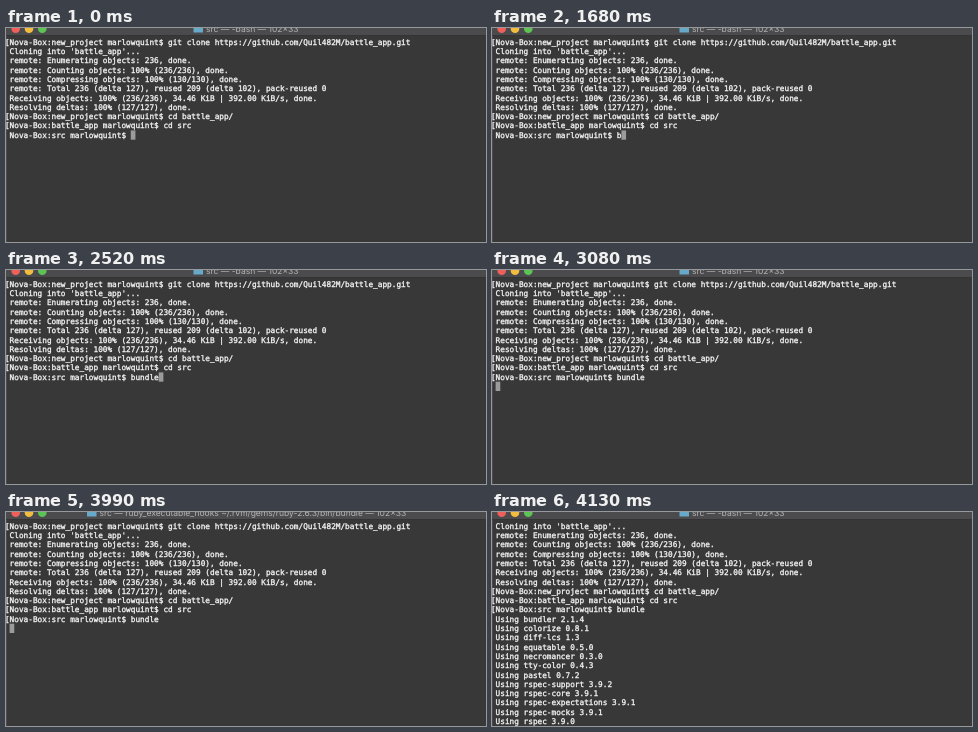
Recreate the animation shown at these times as an HTML page with a canvas. Size 480x214 px, loop 5.32 s.

```html
<!DOCTYPE html>
<html lang="en">
<head>
<meta charset="utf-8">
<title>Terminal</title>
<style>
  html, body { margin: 0; width: 100%; height: 100%; overflow: hidden; background: #383838; }
  canvas { display: block; width: 100vw; height: 100vh; }
</style>
</head>
<body>
<canvas id="stage" width="480" height="214"></canvas>
<script>
const ctx = document.getElementById('stage').getContext('2d');
const LOOP = 5320;
const LEFT = 3.6, TOP = 9.4, COL = 4.66, ROW = 9.3;

const ENTER = 3080, RUNNING = 3150, OUTPUT = 4060, DONE = 4130;
const KEY_TIMES = [1680, 1890, 2030, 2240, 2310, 2450];
const COMMAND = 'bundle';

const prompt = dir => `Nova-Box:${dir} marlowquint$ `;

// A leading bracket marks a finished prompt and hangs in the left margin.
const history = [
  '[' + prompt('new_project') + 'git clone https://github.com/Quil482M/battle_app.git',
  "Cloning into 'battle_app'...",
  'remote: Enumerating objects: 236, done.',
  'remote: Counting objects: 100% (236/236), done.',
  'remote: Compressing objects: 100% (130/130), done.',
  'remote: Total 236 (delta 127), reused 209 (delta 102), pack-reused 0',
  'Receiving objects: 100% (236/236), 34.46 KiB | 392.00 KiB/s, done.',
  'Resolving deltas: 100% (127/127), done.',
  '[' + prompt('new_project') + 'cd battle_app/',
  '[' + prompt('battle_app') + 'cd src'
];

const gems = [
  'bundler 2.1.4', 'colorize 0.8.1', 'diff-lcs 1.3', 'equatable 0.5.0',
  'necromancer 0.3.0', 'tty-color 0.4.3', 'pastel 0.7.2',
  'rspec-support 3.9.2', 'rspec-core 3.9.1', 'rspec-expectations 3.9.1',
  'rspec-mocks 3.9.1', 'rspec 3.9.0'
].map(gem => 'Using ' + gem);

function drawLine(text, row) {
  const y = TOP + row * ROW + 7.3;
  const start = LEFT - (text[0] === '[' ? COL : 0);
  [...text].forEach((char, i) => {
    if (char === ' ') return;
    ctx.fillText(char, start + i * COL, y);
    ctx.strokeText(char, start + i * COL, y);
  });
}

function drawCursor(column, row) {
  ctx.fillStyle = '#9b9b9b';
  ctx.fillRect(LEFT + column * COL, TOP + row * ROW, COL, ROW);
}

function drawTerminal(t) {
  const typed = COMMAND.slice(0, KEY_TIMES.filter(k => t >= k).length);
  const line = (t < ENTER ? '' : '[') + prompt('src') + typed;
  let lines = [...history, line];

  if (t < ENTER) drawCursor(line.length, history.length);
  else if (t < OUTPUT) drawCursor(0, lines.length);
  else lines = [...lines.slice(1), ...gems];

  ctx.font = '7.74px "DejaVu Sans Mono", monospace';
  ctx.fillStyle = '#f5f5f5';
  ctx.strokeStyle = '#f5f5f5';
  ctx.lineWidth = 0.32;
  lines.forEach(drawLine);
}

function drawTitleBar(t) {
  const running = t >= RUNNING && t < DONE;
  const process = running
    ? 'ruby_executable_hooks ~/.rvm/gems/ruby-2.6.3/bin/bundle'
    : '-bash';
  const x = running ? 93.5 : 200;

  ctx.fillStyle = '#4b4b4d';
  ctx.fillRect(0, 0, 480, 7);
  ctx.fillStyle = '#333334';
  ctx.fillRect(0, 7, 480, 0.7);

  ['#f0605a', '#f2bd3f', '#5cc453'].forEach((color, i) => {
    ctx.fillStyle = color;
    ctx.beginPath();
    ctx.arc(9.7 + i * 13.3, 0.7, 4.3, 0, Math.PI * 2);
    ctx.fill();
  });

  ctx.fillStyle = '#67a9c8';
  ctx.fillRect(x - 12.5, 0, 9.5, 4.5);

  ctx.font = '8.5px Inter, sans-serif';
  ctx.fillStyle = '#b4b4b4';
  ctx.fillText(`src — ${process} — 102×33`, x, 4);
}

function frame(now) {
  const t = now % LOOP;
  ctx.textRendering = 'geometricPrecision';
  ctx.fillStyle = '#383838';
  ctx.fillRect(0, 0, 480, 214);
  ctx.fillStyle = '#505050';
  ctx.fillRect(0, 0, 0.8, 214);
  drawTerminal(t);
  drawTitleBar(t);
  requestAnimationFrame(frame);
}

frame(performance.now());
</script>
</body>
</html>
```
